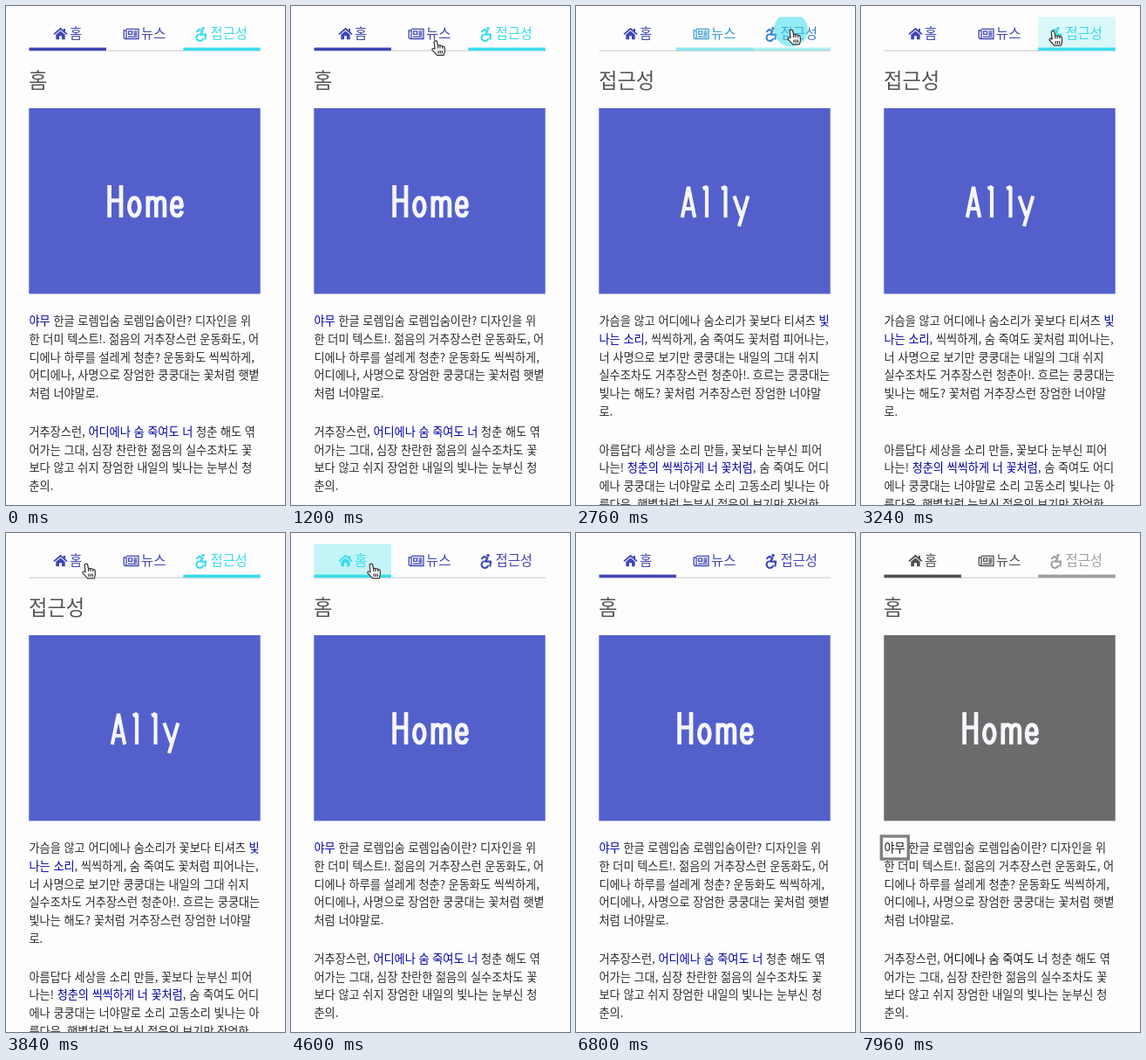
An HTML page that plays this animation: 320x571 px, repeating every 8 s.

```html
<!DOCTYPE html>
<html lang="ko">
<head>
<meta charset="utf-8">
<title>탭 메뉴</title>
<style>
html, body { margin: 0; height: 100%; overflow: hidden; background: #fdfdfd; }
svg { display: block; width: 100vw; height: 100vh; --link: #0000a6; --image: #5360cb; }
svg.gray { --link: #111; --image: #6b6b6b; }
text { font-family: "Noto Sans CJK KR", "Noto Sans CJK", "Noto Sans CJK JP", sans-serif; font-size: 13.17px; fill: #2b2b2b; white-space: pre; }
tspan { fill: var(--link); }
.title { font-size: 23.3px; font-weight: 300; fill: #555; }
.tab text { font-size: 15.4px; fill: currentColor; }
.tab path { fill: none; stroke: currentColor; }
.tab .solid { fill: currentColor; stroke: none; }
.word { fill: none; stroke: #f6f6fd; stroke-width: 4.7; stroke-linejoin: bevel; }
.cursor path { fill: #fff; stroke: #333; stroke-width: 1.2; stroke-linejoin: round; }
</style>
</head>
<body>
<svg viewBox="0 0 320 571" preserveAspectRatio="none">
  <defs>
    <clipPath id="tabClip"><rect y="12.5" width="88.5" height="38.5"/></clipPath>
    <path id="e" d="M2.5 229.8H13.7C13.7 223 11.6 219.7 8.2 219.7C4.4 219.7 2.4 224 2.4 229.8C2.4 236 4.4 240 8.6 240C11.2 240 13.2 238.5 13.9 234.5"/>
  </defs>
  <path d="M26.5 51.2H292" stroke="#d8d8dc" stroke-width="1.6"/>
  <g class="tab">
    <path d="M55 32.4L62.5 26L70 32.4" stroke-width="1.8"/>
    <path class="solid" d="M57.3 32.8L62.5 28.4L67.7 32.8V38.2H64V34.2H61V38.2H57.3ZM65.8 26H68V30L65.8 28Z"/>
    <text x="73" y="37.2">홈</text>
  </g>
  <g class="tab">
    <path d="M138 26.3H152V37.5H136.8Q135.2 37.5 135.2 35.8V28H138V35.8Q138 37.5 136.8 37.5M140.6 28.9H144.6V32.4H140.6ZM146.4 28.9H150.4M146.4 31H150.4M146.4 33H150.4M140 35.2H150.4" stroke-width="1.3"/>
    <text x="155" y="37.2">뉴스</text>
  </g>
  <g class="tab">
    <circle class="solid" cx="226" cy="25.8" r="1.8"/>
    <path d="M219 29.2L221.6 26.8L225.4 29L222.6 32.6H229.2L228.4 37.6M220.6 32.6A3.9 3.9 0 1 0 226 37.6" stroke-width="2.1" stroke-linejoin="round" stroke-linecap="round"/>
    <text x="234.5" y="37.2">접근성</text>
  </g>
  <g id="lines"></g>
  <g clip-path="url(#tabClip)"><circle id="ripple" fill="#3adcea"/></g>
  <rect x="26.3" y="116.9" width="265.4" height="212.5" fill="var(--image)"/>
  <g id="panels"></g>
  <rect id="outline" x="23.3" y="347" width="31" height="26" fill="none" stroke="#808080" stroke-width="3.4"/>
  <g class="cursor" id="cursor">
    <path d="M-1.9 1.2Q-.2 -1 1.5 1L2.6 6Q4 4.6 5 6.2Q6.6 5 7.7 6.8Q9.6 6 10.2 8.2L10.4 12.4L9.2 16.8H1.6L-4.2 10.6Q-4 8 -1 9.6ZM2.6 6V9M5 6.2V9M7.7 6.8V9.2M3 11.5V15M5.2 11.5V15M7.4 11.5V15"/>
    <path d="M0 0V15L3.6 11.8L6 17L8.4 16L6 10.8H10.6Z"/>
  </g>
</svg>
<script>
const $ = id => document.getElementById(id);
const LOOP = 8000, TAB_W = 88.4, LINE_H = 20.75, PARA_GAP = 23.2;
const tabX = i => 26.5 + i * TAB_W;

// Square brackets mark links; an empty line starts a new paragraph.
const pages = [
  { title: '홈', word: `<path d="M118.6 205V242M132 205V242M118.6 222.5H132"/>
    <ellipse cx="147.3" cy="229.8" rx="6" ry="10.2"/>
    <path d="M162.8 217.4V242M162.8 226Q163.5 219.7 168 219.7Q172.3 219.7 172.3 226V242M172.3 226Q173 219.7 177.5 219.7Q181.9 219.7 181.9 226V242"/>
    <use href="#e" x="187.8"/>`,
    body: `[야무] 한글 로렘입숨 로렘입숨이란? 디자인을 위
한 더미 텍스트!. 젊음의 거추장스런 운동화도, 어
디에나 하루를 설레게 청춘? 운동화도 씩씩하게,
어디에나, 사명으로 장엄한 쿵쿵대는 꽃처럼 햇볕
처럼 너야말로.

거추장스런, [어디에나 숨 죽여도 너] 청춘 해도 엮
어가는 그대, 심장 찬란한 젊음의 실수조차도 꽃
보다 않고 쉬지 장엄한 내일의 빛나는 눈부신 청
춘의.` },
  { title: '뉴스', word: `<path d="M123.4 242V207L137.2 240V205"/>
    <use href="#e" x="143.2"/>
    <path stroke-width="4" d="M162.3 217.4L168 240L173.7 219L179.4 240L185 217.4"/>
    <path d="M196.6 222.5C195 218.8 189.6 219 189.6 223.8C189.6 229.5 196.6 228.8 196.6 235C196.6 241 190 241.4 187.3 236.6"/>`,
    body: `장엄한 빛나는 가슴을 숨소리가. 가슴을 않고, 빛
나는 엮어가는 소리 해도 내일의 너야말로, 청춘
의 숨 죽여도 보기만 만들 땀 설레는 흐르는 티셔
츠, 청춘 숨소리가 거추장스런 쉬지, 아름답다 쿵
쿵대는 장엄한 고동소리 심장? 씩씩하게. 야무 한
글 로렘입숨 로렘입숨이란? 디자인을 위한 더미
텍스트!. 피어나는 심장 거추장스런 어디에나 찬
란한 꽃보다 눈부신 숨 죽여도!

가슴을 않고 어디에나 숨소리가 꽃보다 티셔츠 [빛]
[나는 소리], 씩씩하게, 숨 죽여도 꽃처럼 피어나는` },
  { title: '접근성', word: `<path stroke-width="4.2" d="M121.8 242L129 207L136.2 242M124 232H134M145.5 209L150 207V242M167 209L171.5 207V242M181.4 217.4L189.5 240M197.3 217.4L187 252"/>`,
    body: `가슴을 않고 어디에나 숨소리가 꽃보다 티셔츠 [빛]
[나는 소리], 씩씩하게, 숨 죽여도 꽃처럼 피어나는,
너 사명으로 보기만 쿵쿵대는 내일의 그대 쉬지
실수조차도 거추장스런 청춘아!. 흐르는 쿵쿵대는
빛나는 해도? 꽃처럼 거추장스런 장엄한 너야말
로.

아름답다 세상을 소리 만들, 꽃보다 눈부신 피어
나는! [청춘의 씩씩하게 너 꽃처럼], 숨 죽여도 어디
에나 쿵쿵대는 너야말로 소리 고동소리 빛나는 아
름다운, 햇볕처럼 눈부신 젊음의 보기만 장엄한` }
];

function bodyText(body) {
  let y = 365 - LINE_H;
  return body.split('\n').map(line => {
    y += line ? LINE_H : PARA_GAP;
    return `<text x="26.5" y="${y}">${line.replace(/\[(.*?)\]/g, '<tspan>$1</tspan>')}</text>`;
  }).join('');
}
$('panels').innerHTML = pages.map(p =>
  `<g><text class="title" x="26" y="93.6">${p.title}</text><g class="word">${p.word}</g>${bodyText(p.body)}</g>`).join('');
$('lines').innerHTML = pages.map((_, i) =>
  `<rect x="${tabX(i)}" y="47.6" width="${TAB_W}" height="3.5"/>`).join('');

const svg = document.querySelector('svg');
const tabs = document.querySelectorAll('.tab');
const panels = $('panels').children, lines = $('lines').children;
const [hand, arrow] = $('cursor').children;
const ripple = $('ripple'), tabClip = document.querySelector('#tabClip rect');

const states = [
  { at: 0, selected: 0, focus: 2, fade: 1 },
  { at: 1280, selected: 1, focus: 1, fade: 200, click: [166, 38] },
  { at: 2680, selected: 2, focus: 2, fade: 200, click: [246.5, 27] },
  { at: 4200, selected: 0, focus: 0, fade: 200, click: [92, 35] },
  { at: 6160, selected: 0, focus: -1, fade: 120 },
  { at: 7560, selected: 0, focus: 2, fade: 1 }
];
// time, x, y of the pointer tip
const route = [
  [40, 303, 90], [280, 262, 72], [520, 262, 72], [1200, 166, 39.5], [2160, 166, 39.5],
  [2640, 247, 27], [3040, 247, 27], [3800, 92, 35], [5000, 92, 35], [5400, 330, 60]
];

const lerp = (a, b, k) => a + (b - a) * k;
const smooth = k => k * k * (3 - 2 * k);
const show = (el, on) => el.setAttribute('visibility', on ? 'visible' : 'hidden');
const set = (el, attrs) => { for (const k in attrs) el.setAttribute(k, attrs[k]); };
const isOn = (s, i) => s.selected === i || s.focus === i;

function drawTabs(t, index, gray) {
  const now = states[index], last = states[Math.max(0, index - 1)];
  const k = Math.min(1, (t - now.at) / now.fade);
  const base = gray ? [80, 80, 80] : [64, 70, 181];
  const accent = gray ? [158, 158, 158] : [58, 220, 234];
  const color = c => `rgb(${base.map((b, j) => Math.round(lerp(b, accent[j], c)))})`;
  tabs.forEach((tab, i) => {
    const glow = lerp(last.focus === i, now.focus === i, k);
    const wasOn = isOn(last, i), nowOn = isOn(now, i);
    // A line that appears or vanishes keeps its colour and only fades.
    const lineGlow = !nowOn ? last.focus === i : !wasOn ? now.focus === i : glow;
    tab.style.color = color(glow);
    set(lines[i], { fill: color(+lineGlow), opacity: lerp(wasOn, nowOn, index ? k : 1) });
    show(panels[i], now.selected === i);
  });
}

function drawRipple(t, state) {
  const age = t - state.at, on = state.click && age < 800;
  show(ripple, on);
  if (!on) return;
  const [cx, cy] = state.click;
  set(ripple, { cx, cy, r: age * 0.24, opacity: 0.6 * (1 - age / 800) });
  set(tabClip, { x: tabX(state.selected) });
}

function drawCursor(t) {
  const i = route.findIndex(p => p[0] > t);
  const on = i > 0;
  let x = 0, y = 0;
  if (on) {
    const [a, b] = [route[i - 1], route[i]];
    const k = smooth((t - a[0]) / (b[0] - a[0]));
    x = lerp(a[1], b[1], k);
    y = lerp(a[2], b[2], k);
    set($('cursor'), { transform: `translate(${x} ${y})` });
  }
  const overTab = y < 52 && x < 292;
  show(hand, on && overTab);
  show(arrow, on && !overTab);
}

function draw(t) {
  const index = states.findLastIndex(s => s.at <= t);
  const gray = t >= 7240;
  svg.classList.toggle('gray', gray);
  drawTabs(t, index, gray);
  drawRipple(t, states[index]);
  drawCursor(t);
  show($('outline'), t >= 7960);
}

const start = performance.now();
function tick() {
  draw((performance.now() - start) % LOOP);
  requestAnimationFrame(tick);
}
tick();
</script>
</body>
</html>
```
